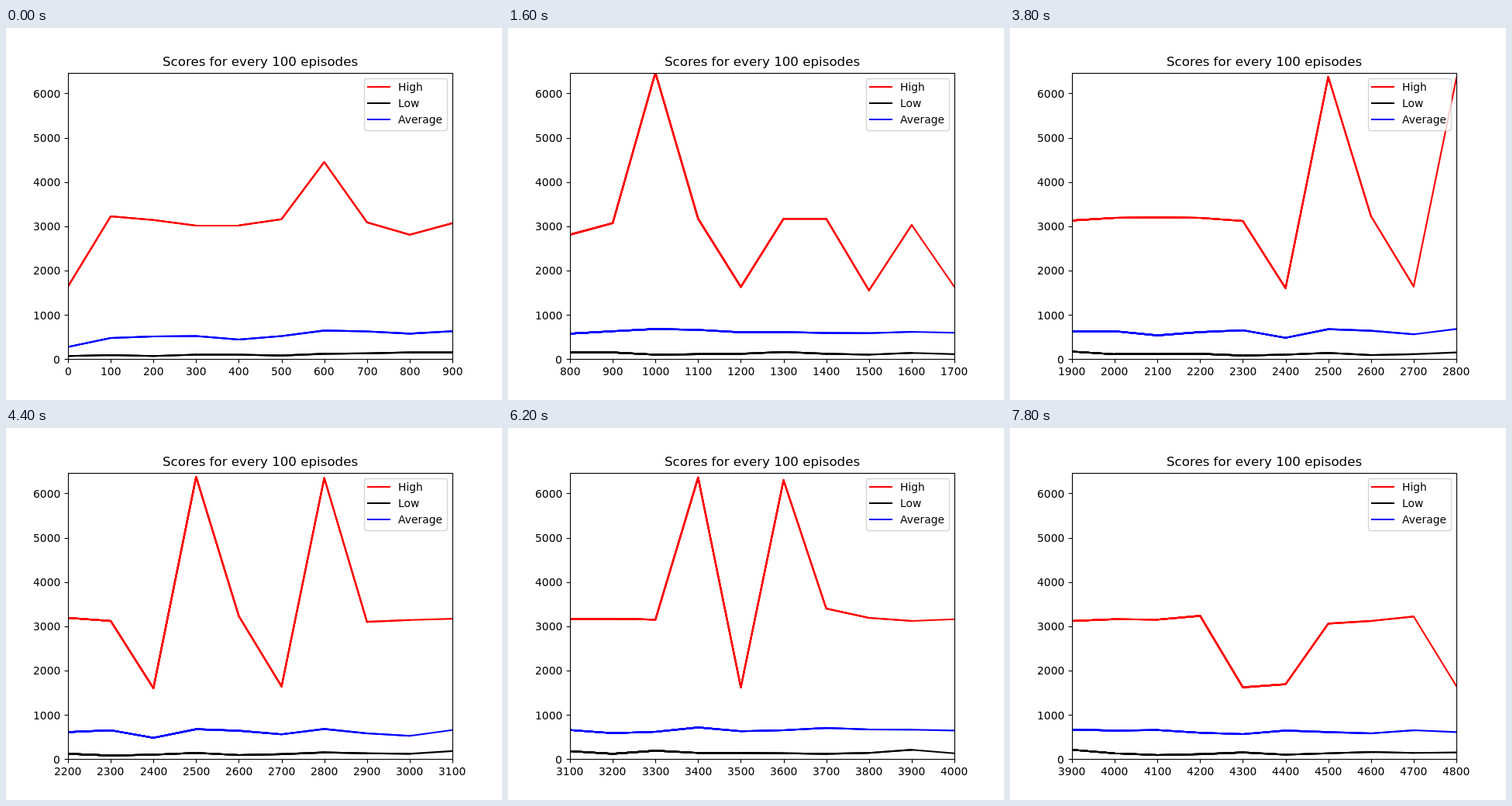
An HTML page with a canvas that plays this animation: 640x480 px, repeating every 8000 ms.

```html
<!DOCTYPE html>
<html lang="en">
<head>
<meta charset="utf-8">
<title>Scores</title>
<style>
  html, body { margin: 0; width: 100%; height: 100%; overflow: hidden; background: #fff; }
  canvas { display: block; }
</style>
</head>
<body>
<canvas id="chart" width="640" height="480"></canvas>
<script>
const ctx = document.getElementById('chart').getContext('2d');

const STEP_MS = 200, STEPS = 40, WINDOW = 9;
const LEFT = 80, RIGHT = 576, TOP = 57.6, BOTTOM = 427.2, Y_MAX = 6470;
const LABEL = 13.89, TITLE = 16.67;

// One value per 100 episodes.
const series = [
  { name: 'High', color: '#f00', values: [
    1640, 3225, 3140, 3015, 3020, 3160, 4450, 3090, 2810, 3070,
    6470, 3170, 1630, 3170, 3170, 1550, 3030, 1630, 3150, 3130,
    3190, 3200, 3190, 3120, 1600, 6375, 3230, 1640, 6350, 3100,
    3140, 3170, 3170, 3150, 6360, 1620, 6300, 3400, 3190, 3120,
    3160, 3150, 3235, 1620, 1690, 3060, 3120, 3220, 1650] },
  { name: 'Low', color: '#000', values: [
    70, 90, 70, 100, 100, 80, 120, 130, 150, 150,
    100, 110, 120, 160, 120, 100, 140, 110, 120, 170,
    110, 110, 120, 80, 100, 140, 90, 110, 150, 130,
    120, 180, 120, 190, 140, 140, 130, 120, 140, 210,
    130, 90, 110, 150, 100, 130, 160, 140, 150] },
  { name: 'Average', color: '#00f', values: [
    275, 475, 510, 520, 440, 520, 645, 625, 575, 630,
    680, 660, 605, 610, 590, 585, 615, 595, 630, 625,
    630, 535, 610, 650, 480, 675, 640, 560, 680, 580,
    525, 655, 585, 615, 715, 630, 650, 705, 670, 665,
    645, 655, 595, 565, 645, 610, 580, 650, 610] }
];

const xAt = column => LEFT + column * (RIGHT - LEFT) / WINDOW;
const yAt = value => BOTTOM - value * (BOTTOM - TOP) / Y_MAX;
const snap = v => Math.floor(v + 0.5) + 0.5;

// align: 0 = left, 0.5 = centre, 1 = right
function text(str, x, baseline, align, size = LABEL) {
  ctx.font = `${size}px "DejaVu Sans", sans-serif`;
  ctx.fillStyle = '#000';
  ctx.fillText(str, Math.round(x - align * ctx.measureText(str).width), Math.round(baseline));
}

function stroke(points, color, width) {
  ctx.strokeStyle = color;
  ctx.lineWidth = width;
  ctx.beginPath();
  points.forEach(([x, y]) => ctx.lineTo(x, y));
  ctx.stroke();
}

// Every step plots the history again, so older segments build up darker edges.
function drawSeries(step) {
  ctx.save();
  ctx.beginPath();
  ctx.rect(LEFT, 58, RIGHT - LEFT, 369);
  ctx.clip();
  ctx.lineJoin = 'round';
  ctx.lineCap = 'square';
  const first = Math.max(0, step - 1);
  for (let pass = Math.max(step - WINDOW, -2); pass <= step; pass++) {
    const last = Math.max(pass, 0) + WINDOW;
    for (const { values, color } of series) {
      const shown = values.slice(first, last + 1);
      stroke(shown.map((v, i) => [xAt(first + i - step), yAt(v)]), color, 2.083);
    }
  }
  ctx.restore();
}

function drawAxes(step) {
  for (let i = 0; i <= WINDOW; i++) {
    const x = snap(xAt(i));
    stroke([[x, 427.5], [x, 432.4]], '#000', 1.11);
    text(String((step + i) * 100), xAt(i), 448, 0.5);
  }
  for (let value = 0; value <= 6000; value += 1000) {
    const y = snap(yAt(value));
    stroke([[80.5, y], [75.6, y]], '#000', 1.11);
    text(String(value), 70.3, yAt(value) + 5.5, 1);
  }
  ctx.strokeStyle = '#000';
  ctx.lineWidth = 1.11;
  ctx.strokeRect(80.5, 58.5, 496, 369);
  text('Scores for every 100 episodes', 328, 49, 0.5, TITLE);
}

function drawLegend() {
  ctx.beginPath();
  ctx.roundRect(462.5, 65.5, 107, 67, 2.8);
  ctx.fillStyle = 'rgba(255,255,255,0.8)';
  ctx.fill();
  ctx.strokeStyle = 'rgba(204,204,204,0.8)';
  ctx.lineWidth = 1.39;
  ctx.stroke();
  series.forEach(({ name, color }, i) => {
    const y = 76 + 21 * i;
    stroke([[466, y], [496, y]], color, 2);
    text(name, 506, y + 5, 0);
  });
}

function draw() {
  const step = Math.floor(performance.now() / STEP_MS) % STEPS;
  ctx.fillStyle = '#fff';
  ctx.fillRect(0, 0, 640, 480);
  drawSeries(step);
  drawAxes(step);
  drawLegend();
  requestAnimationFrame(draw);
}
draw();
</script>
</body>
</html>
```
